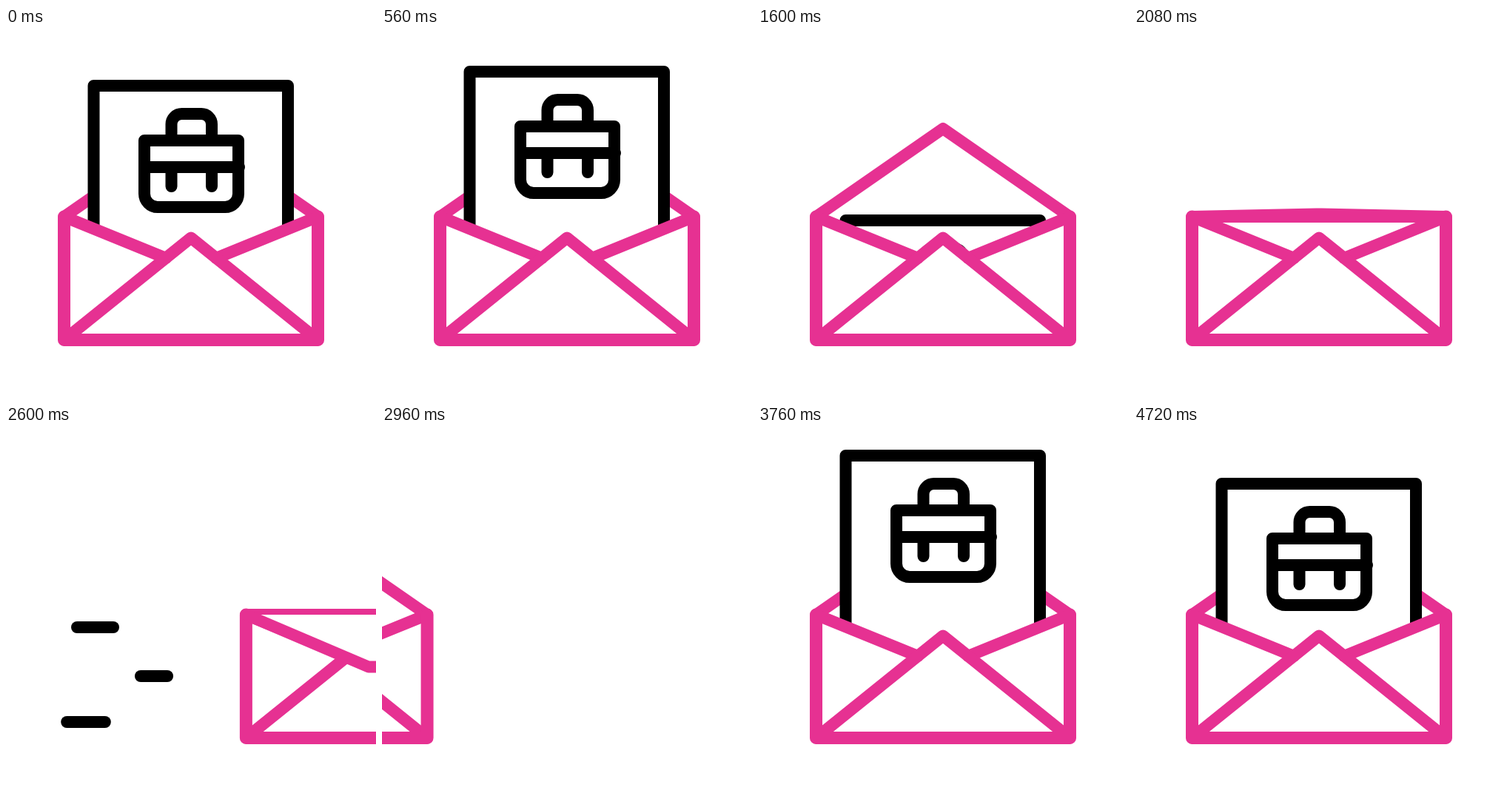
An HTML page that plays this animation: 500x500 px, repeating every 5.4 s.

```html
<!DOCTYPE html>
<html lang="en">
<head>
<meta charset="utf-8">
<title>Job mail</title>
<style>
  html, body { margin: 0; width: 100%; height: 100%; overflow: hidden; background: #fff; }
  svg { display: block; width: 100vw; height: 100vh; }
  .ink, .pink { fill: none; stroke-width: 16; stroke-linecap: round; stroke-linejoin: round; }
  .ink { stroke: #000; }
  .pink { stroke: #e63192; }
  .white { fill: #fff; }
</style>
</head>
<body>
<svg viewBox="0 0 500 500">
  <defs>
    <clipPath id="inside"><rect x="0" y="0" width="500" height="400"/></clipPath>
  </defs>
  <g id="dashes" class="ink"></g>
  <g id="mail">
    <g id="back"></g>
    <g clip-path="url(#inside)">
      <g id="letter" class="ink">
        <path class="white" d="M118.5 700V78H381V700"/>
        <path d="M187 152H314V218Q314 242 298 242H203Q187 242 187 218Z" style="display:none"/>
        <path d="M187 152H314V224A18 18 0 0 1 296 242H205A18 18 0 0 1 187 224Z"/>
        <path d="M187 188H315M223.5 188V214M278 188V214"/>
        <path d="M223.5 152V130A14 14 0 0 1 237.5 116H264A14 14 0 0 1 278 130V152"/>
      </g>
    </g>
    <path class="white" d="M78.5 255L216 311L250 283.5L284 311L421.5 255V421.5H78.5Z"/>
    <g class="pink">
      <path d="M78.5 255L216 311M421.5 255L284 311"/>
      <path d="M78.5 421.5L250 283.5L421.5 421.5"/>
      <path d="M78.5 255V421.5H421.5V255" stroke-width="17" style="stroke-width:17"/>
      <path id="hinge" d="M78.5 255H421.5"/>
    </g>
    <g id="front"></g>
  </g>
</svg>
<script>
const LOOP = 5400, STEP = 40, LAST = 4720;
const SWAP = 2840; // envelope is off stage on both sides here
const HINGE = 255, OPEN = 136, SHUT = 325.5;
const UP = -38, DOWN = 240;
const NS = 'http://www.w3.org/2000/svg';
const el = id => document.getElementById(id);
const [mail, letter, back, front, hinge] =
  ['mail', 'letter', 'back', 'front', 'hinge'].map(el);

function addPath(parent, cls) {
  const p = document.createElementNS(NS, 'path');
  if (cls) p.setAttribute('class', cls);
  parent.appendChild(p);
  return p;
}

const flap = addPath(back, 'pink white');
const dashes = [
  { y: 272, from: 56, to: 185 },
  { y: 338, from: 152.5, to: 247.5 },
  { y: 400, from: 40, to: 176 }
].map(d => ({ ...d, path: addPath(el('dashes')) }));

// eased progress of t from start over len
function ease(t, start, len) {
  const u = Math.min(1, Math.max(0, (t - start) / len));
  return u * u * (3 - 2 * u);
}
const mix = (a, b, p) => a + (b - a) * p;

function letterY(t) {
  if (t < 1120) return mix(0, UP, ease(t, 0, 1120));
  if (t < SWAP) return mix(UP, DOWN, ease(t, 1120, 680));
  if (t < 3745) return mix(DOWN, UP, ease(t, 2960, 785));
  return mix(UP, 0, ease(t, 3745, 975));
}

function mailX(t) {
  return t < SWAP ? 450 * ease(t, 2240, 678) : -450 * (1 - ease(t, 2753, 723));
}

function drawFlap(t) {
  const p = t < SWAP ? ease(t, 1775, 532) : 0;
  const y = mix(OPEN, SHUT, p), w = 6 * p;
  flap.setAttribute('d', `M78.5 ${HINGE}L${250 - w} ${y}H${250 + w}L421.5 ${HINGE}`);
  const layer = y > HINGE ? front : back;
  if (flap.parentNode !== layer) layer.appendChild(flap);
  hinge.style.display = y > 240 ? '' : 'none';
}

function drawDashes(t) {
  const head = ease(t, 2323, 440), tail = ease(t, 2437, 440);
  for (const { y, from, to, path } of dashes) {
    path.style.display = head > tail ? '' : 'none';
    path.setAttribute('d', `M${mix(from, to, tail)} ${y}H${mix(from, to, head)}`);
  }
}

function draw(t) {
  mail.setAttribute('transform', `translate(${mailX(t)} 0)`);
  const y = letterY(t);
  letter.setAttribute('transform', `translate(0 ${y})`);
  letter.style.display = y < DOWN ? '' : 'none';
  drawFlap(t);
  drawDashes(t);
}

const begin = performance.now();
function tick() {
  const t = (performance.now() - begin) % LOOP;
  draw(Math.min(LAST, Math.floor(t / STEP) * STEP));
  requestAnimationFrame(tick);
}
tick();
</script>
</body>
</html>
```
